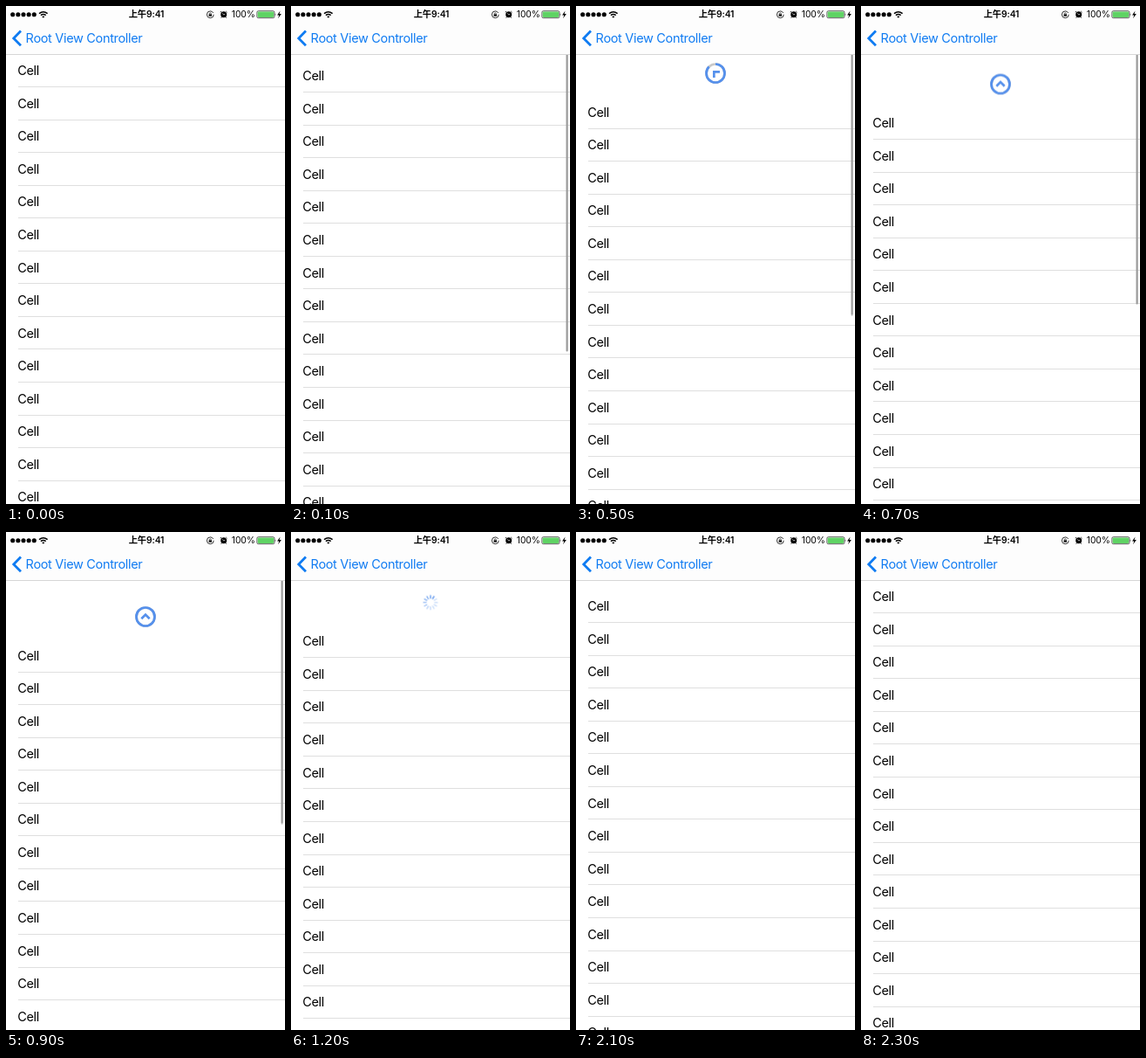
Write an HTML page that moves like this. It is 320x570 px and loops after 2.4 s.

```html
<!DOCTYPE html>
<html lang="en">
<head>
<meta charset="utf-8">
<title>Pull to refresh</title>
<style>
  @property --pull { syntax: "<number>"; inherits: true; initial-value: 0; }

  html, body { margin: 0; width: 100%; height: 100%; overflow: hidden; background: #fff; }
  svg { display: block; width: 320px; height: 570px; }
  text { font-family: Inter, Roboto, "Liberation Sans", sans-serif; }
  .body { font-size: 14.5px; letter-spacing: -.0225em; }
  .status { font-size: 10.3px; letter-spacing: -.01em; }
  .time { font-family: Inter, "Noto Sans CJK SC", "Noto Sans CJK", sans-serif; font-weight: 600; }
  .line { fill: none; stroke-linejoin: miter; }
  .rule { fill: #dfdfdf; shape-rendering: crispEdges; }

  /* the list, the indicator and the scroll bar all follow --pull */
  #stage { animation: pull 2.4s step-end infinite; }
  #list, #head { transform: translateY(calc(var(--pull) * 1px)); }
  #bar { transform: translateY(calc(var(--pull) * -1px)); animation: bar 2.4s step-end infinite; }

  #ring { --p: clamp(0, (var(--pull) - 19.5) / 32, 1); animation: ring 2.4s step-end infinite; }
  #arc { stroke-dasharray: 1px; stroke-dashoffset: calc((1 - var(--p)) * 1px); }
  #arrow { transform: rotate(calc(var(--p) * 360deg)); }

  #spinner { opacity: 0; animation: busy 2.4s step-end infinite; }
  #spokes { animation: spin 2.4s step-end infinite; }

  @keyframes pull {
    0% { --pull: 0; }
    4.166% { --pull: 6; }
    8.333% { --pull: 20; }
    12.5% { --pull: 31.5; }
    16.666% { --pull: 40.5; }
    20.833% { --pull: 47.5; }
    25% { --pull: 54; }
    29.166% { --pull: 60; }
    33.333% { --pull: 65; }
    37.5% { --pull: 67.5; }
    41.666% { --pull: 63; }
    45.833% { --pull: 54; }
    50% { --pull: 51.2; }
    79.166% { --pull: 46; }
    83.333% { --pull: 29; }
    87.5% { --pull: 11; }
    91.666% { --pull: 2; }
    95.833%, 100% { --pull: 0; }
  }
  @keyframes bar {
    0% { opacity: 0; }
    4.166% { opacity: 1; }
    41.666% { opacity: .7; }
    45.833% { opacity: .3; }
    50%, 100% { opacity: 0; }
  }
  @keyframes ring {
    0% { opacity: 1; }
    41.666%, 100% { opacity: 0; }
  }
  @keyframes busy {
    0% { opacity: 0; }
    41.666%, 100% { opacity: 1; }
  }
  @keyframes spin {
    0%, 41.666% { transform: rotate(-90deg); }
    45.833% { transform: rotate(-30deg); }
    50% { transform: rotate(30deg); }
    54.166% { transform: rotate(90deg); }
    58.333% { transform: rotate(150deg); }
    62.5% { transform: rotate(210deg); }
    66.666% { transform: rotate(270deg); }
    70.833% { transform: rotate(300deg); }
    75% { transform: rotate(360deg); }
    79.166% { transform: rotate(420deg); }
    83.333% { transform: rotate(480deg); }
    87.5%, 100% { transform: rotate(540deg); }
  }
</style>
</head>
<body>
<svg id="stage" viewBox="0 0 320 570">
  <rect width="320" height="570" fill="#fff"/>
  <g id="list"></g>

  <g id="head">
    <g transform="translate(160 29.5)">
      <g id="ring" class="line" stroke="#5590ec" stroke-width="2.7">
        <circle r="10.5" stroke="#c9c9c9"/>
        <circle id="arc" r="10.5" pathLength="1" transform="rotate(-90)"/>
        <path id="arrow" d="M-4.7 2.3 0 -2.4 4.7 2.3"/>
      </g>
      <g id="spinner"><g id="spokes"></g></g>
    </g>
  </g>

  <rect id="bar" x="315.5" y="20" width="2.2" height="381.5" rx="1.1" fill="#999"/>

  <g id="nav">
    <rect width="320" height="55" fill="#fdfdfd"/>
    <rect y="55" width="320" height="1" fill="#d6d6d6"/>
    <path class="line" d="M17 28.6 8.8 36.9 17 45.2" stroke="#0f7bf2" stroke-width="2.8"/>
    <text class="body" x="22.6" y="42.2" fill="#0f7bf2">Root View Controller</text>
  </g>

  <g id="signal"></g>
  <g class="line" stroke="#000" stroke-width="1.5">
    <path d="M38 8.7Q42.8 4.7 47.6 8.7"/>
    <path d="M39.9 10.7Q42.8 8.3 45.7 10.7"/>
  </g>
  <path d="M41.2 12Q42.8 10.8 44.4 12L42.8 13.7Z"/>
  <text class="status time" x="161" y="13.4" text-anchor="middle">上午9:41</text>

  <g transform="translate(234.3 9.8)">
    <circle class="line" r="3.9" stroke="#000" stroke-width=".8" stroke-dasharray="22 2.5"/>
    <rect x="-1.7" y="-.4" width="3.4" height="2.3"/>
    <path class="line" d="M-1 -.3V-1A1 1 0 0 1 1 -1V-.3" stroke="#000" stroke-width=".6"/>
  </g>

  <g transform="translate(249.7 9.8)">
    <circle r="3.5"/>
    <path class="line" d="M-3.8 -2.6-2.6 -3.8M3.8 -2.6 2.6 -3.8M-2.3 2.8-2.9 3.8M2.3 2.8 2.9 3.8" stroke="#000" stroke-width=".9"/>
    <path class="line" d="M-1.5 -1.5 0 .2 1.5 -.5" stroke="#fff" stroke-width=".7"/>
  </g>

  <text class="status" x="258.8" y="13.4">100%</text>
  <rect x="287.9" y="5.7" width="20" height="8" rx="1.5" fill="#fff" stroke="#333" stroke-width=".8"/>
  <rect x="288.7" y="6.5" width="18.4" height="6.4" rx=".8" fill="#5fd364"/>
  <path d="M308.7 8.2Q310 9.7 308.7 11.2Z"/>
  <path d="M314.5 5.6 311 10.5H313.2L312.1 14.2 315.8 8.9H313.5Z"/>
</svg>

<script>
  const ROW = 37.55, TOP = 55.2;

  function add(parent, tag, attrs, label = "") {
    const node = document.createElementNS("http://www.w3.org/2000/svg", tag);
    for (const key in attrs) node.setAttribute(key, attrs[key]);
    node.textContent = label;
    document.getElementById(parent).append(node);
  }

  for (let i = 0; i < 14; i++) {
    const y = TOP + i * ROW;
    add("list", "text", { class: "body", x: 13.2, y: y + 24 }, "Cell");
    add("list", "rect", { class: "rule", x: 13.5, y: y + ROW - .7, width: 306.5, height: 1 });
  }

  for (let i = 0; i < 5; i++) {
    add("signal", "circle", { cx: 7.7 + i * 6.15, cy: 9.8, r: 2.55 });
  }

  // spoke 0 leads, the others fade behind it
  for (let i = 0; i < 12; i++) {
    add("spokes", "rect", {
      x: -.75, y: -8.7, width: 1.5, height: 4.5, rx: .75, fill: "#4d8bea",
      opacity: Math.max(.28, .85 - i * .08), transform: `rotate(${-30 * i})`
    });
  }
</script>
</body>
</html>
```
